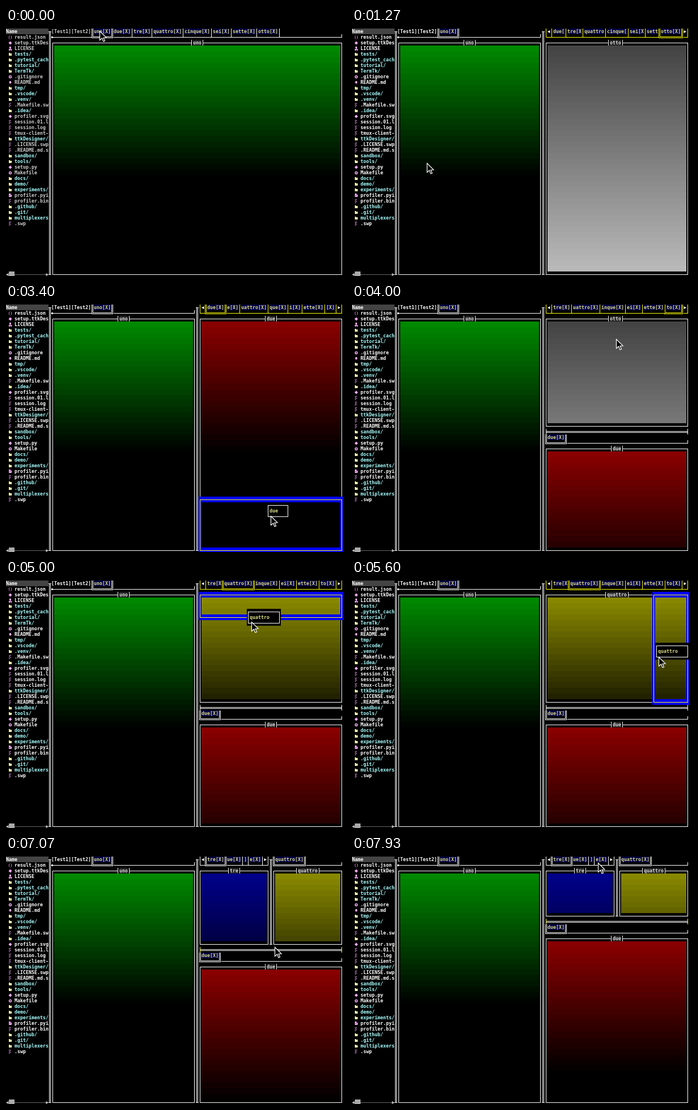
These frames come from a looping animation (600 px wide and 439 px high, 8 s). An HTML page with a canvas:

```html
<!DOCTYPE html>
<html lang="en">
<head>
<meta charset="utf-8">
<title>Tiling tabs</title>
<style>
html, body { margin: 0; width: 100%; height: 100%; overflow: hidden; background: #000; }
canvas { display: block; }
</style>
</head>
<body>
<canvas id="stage" width="600" height="439"></canvas>
<script>
const ctx = document.getElementById('stage').getContext('2d');
const CW = 5, RH = 10;              // terminal cell size
const TICKS = 120, PER_SECOND = 15; // screen refresh steps
const WHITE = '#fff', YELLOW = '#ff0', TAB_FG = '#dddd88', TAB_BG = '#000044';

// [base rgb, change per row]
const FILLS = {
  uno: [[0, 136, 0], -6], due: [[136, 0, 0], -6], tre: [[0, 0, 136], -6],
  quattro: [[136, 136, 0], -6], otto: [[68, 68, 68], 3]
};

// First letter selects the icon
const FILES = ('jresult.json dsetup.ttkDes kLICENSE ftests/ f.pytest_cach ftutorial/ fTermTk/ ' +
  'g.gitignore aREADME.md ftmp/ f.vscode/ f.venv/ l.Makefile.sw f.idea/ dprofiler.svg ' +
  'lsession.01.l lsession.log ltmux-client- fttkDesigner/ l.LICENSE.swp l.README.md.s ' +
  'fsandbox/ ftools/ dsetup.py gMakefile fdocs/ fdemo/ fexperiments/ pprofiler.pyi ' +
  'lprofiler.bin f.github/ f.git/ fmultiplexers l.swp').split(' ');

const BARS = {
  all: '║uno[X]║due[X]│tre[X]│quattro[X]│cinque[X]│sei[X]│sette[X]│otto[X]│',
  otto: '│◀│due[│tre[X│quattro│cinque[│sei[X│sett║otto[X]║▶│',
  due: '│◀║due[X]║e[X]│uattro[X]│que[X]│i[X]│ette[X]│[X]│▶│',
  rest: '│◀│tre[X]│uattro[X]│inque[X]│ei[X]│ette[X]│to[X]║▶│',
  quattro: '│◀│tre[X║quattro[X]║inque[X]│ei[X]│ette[X]│to[X]│▶│',
  tre: '│◀║tre[X]║ue[X]│]│e[X]│▶│'
};

// Pointer: [tick, x, y]
const PATH = [
  [0, 165, 5], [5, 165, 5], [15, 132, 239], [19, 132, 239], [24, 374, 2], [30, 374, 2],
  [39, 365, 5], [41, 365, 5], [42, 366, 14], [52, 470, 385], [55, 470, 385],
  [60, 466, 62], [67, 407, 4], [70, 407, 4], [71, 408, 8], [75, 433, 74], [83, 541, 136],
  [84, 541, 136], [86, 546, 136], [88, 546, 136], [96, 472, 233], [99, 472, 225],
  [101, 472, 225], [110, 476, 115], [114, 523, 20], [119, 434, 12], [120, 434, 12]
];

// Dragged tab: [first tick, end tick, label]
const DRAGS = [[7, 19, 'uno'], [43, 56, 'due'], [72, 89, 'quattro']];

// Drop area: [first tick, end tick, left, top, right, bottom] in cells
const DROPS = [
  [8, 19, 16, 2, 41, 43], [44, 46, 68, 2, 118, 11], [49, 56, 68, 34, 118, 43],
  [73, 78, 68, 2, 118, 6], [84, 89, 106, 2, 118, 21]
];

const midX = c => c * CW + 2;
const midY = r => r * RH + 6;
const topY = r => r * RH + 1;

function rect(x, y, w, h, color) {
  ctx.fillStyle = color;
  ctx.fillRect(x, y, w, h);
}
const hline = (x0, x1, y, color) => rect(x0, y, x1 - x0 + 1, 1, color);
const vline = (x, y0, y1, color) => rect(x, y0, 1, y1 - y0 + 1, color);

function text(s, c, r, color) {
  ctx.fillStyle = color;
  ctx.fillText(s, c * CW, r * RH + 9);
}

function poly(points, color) {
  ctx.beginPath();
  points.forEach(([x, y]) => ctx.lineTo(x, y));
  ctx.closePath();
  ctx.fillStyle = color;
  ctx.fill();
}

function box(c0, r0, c1, r1, color) {
  const x0 = midX(c0), x1 = midX(c1), y0 = midY(r0), y1 = midY(r1);
  hline(x0, x1, y0, color);
  hline(x0, x1, y1, color);
  vline(x0, y0, y1, color);
  vline(x1, y0, y1, color);
}

function arrow(c, r, dir, color) {
  const x = midX(c) + 0.5, y = midY(r) + 0.5;
  poly([[x + 2.5 * dir, y], [x - 2 * dir, y - 2.5], [x - 2 * dir, y + 2.5]], color);
}

function panel(name, c0, r0, c1, r1) {
  const [base, step] = FILLS[name];
  for (let r = r0 + 1; r < r1; r++) {
    const shift = step * (r - r0 - 1);
    const rgb = base.map(v => v ? Math.max(0, v + shift) : 0);
    rect((c0 + 1) * CW, topY(r), (c1 - c0 - 1) * CW, RH, `rgb(${rgb})`);
  }
  box(c0, r0, c1, r1, WHITE);
  const len = name.length, t = c0 + Math.floor((c1 - c0 - 1 - len) / 2);
  rect(midX(t), topY(r0), (len + 1) * CW, RH, '#000');
  rect((t + 1) * CW, topY(r0), len * CW, RH, '#222');
  [t, t + len + 1].forEach(c => vline(midX(c), topY(r0), topY(r0) + 9, WHITE));
  text(name, t + 1, r0, '#ddd');
}

function tabBar(c0, c1, r, tabs, color, first = c0) {
  const top = topY(r), base = midY(r + 1), chars = [...tabs];
  hline(midX(c0), midX(c1), base, color);
  vline(midX(c1), top + RH, base, color);

  // Cells between separators
  let start = 0;
  chars.forEach((ch, i) => {
    if (ch !== '│' && ch !== '║') return;
    const label = chars.slice(start, i).join('');
    if (label === '◀') arrow(first + start, r, -1, WHITE);
    else if (label === '▶') arrow(first + start, r, 1, WHITE);
    else if (label) {
      rect((first + start) * CW, top, label.length * CW, RH, TAB_BG);
      text(label, first + start, r, TAB_FG);
    }
    if (ch === '│') vline(midX(first + i), top, base, color);
    start = i + 1;
  });

  // Current tab
  const end = tabs.lastIndexOf('║');
  let begin = tabs.indexOf('║');
  const cut = begin === end;
  if (cut) begin = tabs.lastIndexOf('│', end);
  const x0 = midX(first + begin), x1 = midX(first + end);
  rect(x0, base, x1 - x0 + 3, 1, '#000');
  if (!cut) {
    vline(x0 - 1, top, base + 1, color);
    vline(x0 + 1, top, base - 1, color);
  }
  vline(x1 - 1, top, base - 1, color);
  vline(x1 + 1, top, base + 1, color);
  hline(x0 + 1, x1 - 1, base - 1, color);
  hline(x0 - 1, x1 + 1, base + 1, color);
}

function vsplit(c, r1) {
  const x = midX(c), y0 = midY(0), y1 = midY(r1);
  [y0, y1].forEach(y => hline(x - 2, x + 2, y, WHITE));
  [x - 1, x + 1].forEach(v => vline(v, y0, y1, WHITE));
}

function hsplit(c0, c1, r, capColor) {
  const y = midY(r);
  [y - 1, y + 1].forEach(v => hline(midX(c0), midX(c1), v, WHITE));
  [c0, c1].forEach(c => vline(midX(c), y - 5, y + 4, capColor));
}

const PINK = '#ffaaff';
const ICONS = {
  f(y) { rect(5, y - 2, 2, 1, '#ffffaa'); rect(5, y - 1, 5, 4, '#ffffaa'); },
  l(y) { [4, 3, 4, 2].forEach((w, i) => rect(5, y - 3 + i * 2, w, 1, '#c080c0')); },
  d(y) { poly([[7.5, y - 2.5], [10.5, y + 0.5], [7.5, y + 3.5], [4.5, y + 0.5]], PINK); },
  a(y) { rect(6, y - 2, 3, 3, PINK); poly([[5, y], [10, y], [7.5, y + 3]], PINK); },
  k(y) {
    rect(6, y - 3, 3, 3, PINK);
    rect(7, y, 1, 2, PINK);
    rect(5, y + 1, 2, 3, PINK);
    rect(8, y + 1, 2, 3, PINK);
  },
  p(y) { rect(5, y - 3, 5, 6, PINK); rect(8, y - 3, 2, 2, '#000'); rect(6, y, 2, 1, '#503050'); },
  g(y) {
    ctx.strokeStyle = PINK;
    ctx.lineWidth = 1.5;
    ctx.beginPath();
    ctx.arc(7.5, y + 0.5, 1.9, 0, 7);
    ctx.stroke();
  },
  j(y) {
    [5, 9].forEach(x => rect(x, y - 2, 1, 5, '#c080c0'));
    [-3, 3].forEach(d => { rect(6, y + d, 1, 1, '#804080'); rect(8, y + d, 1, 1, '#804080'); });
  }
};

function tree(fg) {
  FILES.forEach((file, i) => {
    const kind = file[0];
    ICONS[kind](midY(i + 1));
    text(file.slice(1), 3, i + 1, kind === 'f' ? '#aaffff' : fg);
  });
  rect(0, 1, 75, 10, '#444');
  text('Name', 0, 0, WHITE);
  for (let x = 15; x < 70; x += 2) rect(x, 436, 1, 1, '#ccc');
  rect(5, 431, 10, 8, '#aaa');
  arrow(0, 43, -1, '#ccc');
  arrow(14, 43, 1, '#ccc');
}

function pointerAt(k) {
  const i = PATH.findIndex(p => p[0] > k);
  const [k0, x0, y0] = PATH[i - 1], [k1, x1, y1] = PATH[i];
  const u = (k - k0) / (k1 - k0), e = u * u * (3 - 2 * u);
  return [Math.round(x0 + (x1 - x0) * e), Math.round(y0 + (y1 - y0) * e)];
}

function drawPointer(x, y) {
  ctx.save();
  ctx.translate(x + 0.5, y + 0.5);
  poly([[0, 0], [0, 16], [4, 12.5], [6.5, 18.5], [9, 17.5], [6.5, 11.8], [11.5, 11.5]], '#000');
  ctx.strokeStyle = WHITE;
  ctx.lineWidth = 1.2;
  ctx.stroke();
  ctx.restore();
}

function drawRight(k, y) {
  const focus = k < 102 ? YELLOW : WHITE;
  if (k < 56) {
    const name = k < 42 ? 'otto' : 'due';
    tabBar(68, 118, 0, BARS[name], focus);
    panel(name, 68, 2, 118, 43);
    return;
  }
  const split = k < 102 ? 22 : Math.max(11, Math.min(22, Math.floor((y - 1) / RH)));
  if (k < 89) {
    const name = k < 71 ? 'otto' : 'quattro';
    tabBar(68, 118, 0, k < 71 ? BARS.rest : BARS.quattro, focus);
    panel(name, 68, 2, 118, split - 1);
  } else {
    tabBar(68, 92, 0, BARS.tre, focus);
    panel('tre', 68, 2, 92, split - 1);
    vsplit(93, split - 1);
    tabBar(94, 118, 0, '║quattro[X]║', WHITE);
    panel('quattro', 94, 2, 118, split - 1);
  }
  hsplit(68, 118, split, k < 102 ? WHITE : YELLOW);
  tabBar(68, 118, split + 1, '║due[X]║', WHITE);
  panel('due', 68, split + 3, 118, 43);
}

function drawDrop([, , c0, r0, c1, r1]) {
  const x = c0 * CW, y = topY(r0), w = (c1 - c0 + 1) * CW, h = (r1 - r0 + 1) * RH;
  const blue = '#0000ff';
  rect(x, y, w, RH, blue);
  rect(x, y + h - RH, w, RH, blue);
  rect(x, y, CW, h, blue);
  rect(x + w - CW, y, CW, h, blue);
  box(c0, r0, c1, r1, YELLOW);
}

function drawDrag(label, x, y) {
  const c = Math.floor(x / CW) - 1, r = Math.floor(y / RH) - 2, w = label.length + 5;
  rect(c * CW, topY(r), w * CW, 3 * RH, '#000');
  box(c, r, c + w - 1, r + 2, WHITE);
  text(label, c + 1, r + 1, TAB_FG);
}

function draw(k) {
  const [x, y] = pointerAt(k);
  const active = list => list.find(([from, to]) => k >= from && k < to);
  const fg = k < 6 ? '#ccc' : WHITE;
  rect(0, 0, 600, 439, '#000');
  ctx.font = 'bold 8.3px "DejaVu Sans Mono", monospace';
  tree(fg);
  vsplit(15, 43);

  const whole = k < 19, right = whole ? 118 : 66;
  tabBar(16, right, 0, whole ? BARS.all : '║uno[X]║', whole && k >= 6 ? YELLOW : WHITE, 30);
  rect(80, 15, 3, 3, WHITE);
  text('[Test1][Test2]', 16, 0, fg);
  panel('uno', 16, 2, right, 43);
  if (!whole) {
    vsplit(67, 43);
    drawRight(k, y);
  }

  const drop = active(DROPS), drag = active(DRAGS);
  if (drop) drawDrop(drop);
  if (drag) drawDrag(drag[2], x, y);
  drawPointer(x, y);
}

const begun = performance.now();
function frame() {
  const t = (performance.now() - begun) % 8000;
  draw(Math.floor((t + 5) * PER_SECOND / 1000) % TICKS);
  requestAnimationFrame(frame);
}
frame();
</script>
</body>
</html>
```
